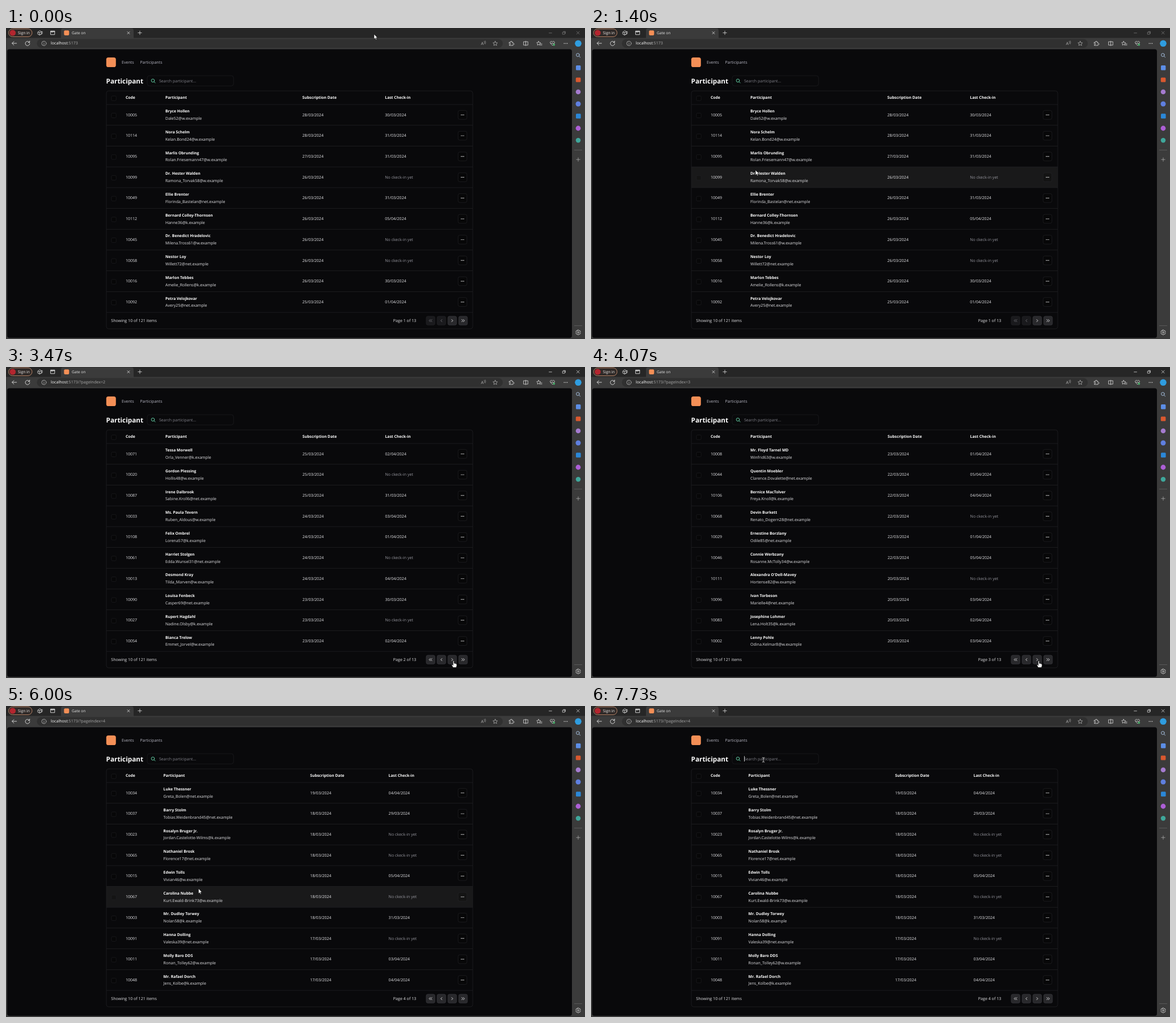
An HTML page with a canvas that plays this animation: 1021 px wide and 549 px high, repeating every 8000 ms.

```html
<!DOCTYPE html>
<html lang="en">
<head>
<meta charset="utf-8">
<title>Participants</title>
<style>
  html, body { margin: 0; width: 100%; height: 100%; overflow: hidden; background: #09090b; }
  canvas { display: block; width: 1021px; height: 549px; }
</style>
</head>
<body>
<canvas id="stage"></canvas>
<script>
const W = 1021, H = 549, LOOP = 8000, STEP = 1000 / 15;
const FONT = '"Open Sans", "Noto Sans", sans-serif';
const canvas = document.getElementById('stage');
const ctx = canvas.getContext('2d');
const dpr = window.devicePixelRatio || 1;
canvas.width = Math.round(W * dpr);
canvas.height = Math.round(H * dpr);

// code, name, mailbox, day of subscription, check-in (day/month or -)
const parse = s => s.trim().split('\n').map(r => r.trim().split(','));
const MAIL = { w: 'w.example', k: 'k.example', n: 'net.example' };

const PAGES = [
  { cols: [281, 522.5, 668.3], url: '', rows: parse(`
    10005,Bryce Hollen,Dale52@w,28,30/03
    10114,Nora Schelm,Kelan.Bond24@w,28,31/03
    10095,Marlis Obrunding,Rolan.Friesemann47@w,27,31/03
    10099,Dr. Hester Walden,Ramona_Torvak58@w,26,-
    10049,Ellie Brenter,Florinda_Bastelan@n,26,31/03
    10112,Bernard Colley-Thornsen,Hanne36@k,26,05/04
    10045,Dr. Benedict Hradelovic,Milena.Tross61@w,26,-
    10058,Nestor Loy,Willett72@n,26,-
    10016,Marlon Tebbes,Amelie_Rollens@k,26,30/03
    10092,Petra Velojkovar,Avery25@n,25,01/04`) },
  { cols: [281, 522.8, 668.5], url: '/?pageIndex=2', rows: parse(`
    10071,Tessa Morwell,Orla_Venner@k,25,02/04
    10020,Gordon Plessing,Hollis48@w,25,-
    10087,Irene Dalbrook,Sabine.Kroll6@n,25,31/03
    10033,Ms. Paula Tevern,Ruben_Aldous@w,24,03/04
    10108,Felix Ombrel,Lorena57@k,24,01/04
    10061,Harriet Stolgen,Edda.Wunsel31@n,24,-
    10013,Desmond Kray,Tilda_Marven@w,24,04/04
    10090,Louisa Fenbeck,Casper69@n,23,30/03
    10027,Rupert Hagdahl,Nadine.Olsby@k,23,-
    10054,Bianca Trelow,Emmet_Jorvel@w,23,02/04`) },
  { cols: [281, 523, 668.6], url: '/?pageIndex=3', rows: parse(`
    10008,Mr. Floyd Tarnel MD,Winfrid63@w,23,01/04
    10044,Quentin Moebler,Clarence.Dovalette@n,22,05/04
    10106,Bernice MacTolver,Freya.Knoll@k,22,04/04
    10068,Devin Burkett,Renato_Dogern28@n,22,-
    10029,Ernestine Borzlany,Odile85@n,22,01/04
    10046,Connie Werbzany,Rosanne.McTolly34@w,22,05/04
    10111,Alexandra O'Dell-Mavey,Hortense82@w,20,-
    10096,Ivan Torbeson,Marielle4@n,20,03/04
    10083,Josephine Lohmer,Lena.Holt35@k,20,02/04
    10002,Lenny Pohle,Odina.Kelmar8@w,20,03/04`) },
  { cols: [277.6, 536.2, 674.6], url: '/?pageIndex=4', rows: parse(`
    10034,Luke Thessner,Greta_Bolen@n,19,04/04
    10037,Barry Stolm,Tobias.Weidenbrand45@n,18,29/03
    10023,Rosalyn Bruger Jr.,Jordan.Castelotte-Wilms@k,18,-
    10065,Nathaniel Brosk,Florence17@n,18,-
    10015,Edwin Tolls,Vivian46@w,18,05/04
    10067,Carolina Nubbe,Kurt.Ewald-Brink73@w,18,-
    10003,Mr. Dudley Torwey,Nolan58@k,18,31/03
    10091,Hanna Dolling,Valeska39@n,17,-
    10011,Molly Baro DDS,Ronan_Tolley62@w,17,03/04
    10048,Mr. Rafael Dorch,Jens_Kolbe@k,17,04/04`) }
];
const PAGE_TIMES = [0, 2850, 4050, 5120];
const FOCUS_TIME = 2180, CARET_TIME = 7450;

// Pointer hot spot: time, x, y
const PATH = [
  [0, 649, 11], [200, 590, 40], [470, 400, 128], [670, 320, 165], [870, 300, 188],
  [1000, 296, 172], [1130, 292, 158], [1400, 290, 251], [1530, 292, 283], [1730, 300, 262],
  [1800, 430, 330], [1870, 680, 450], [1930, 789, 518], [2200, 789, 518], [2330, 789, 516],
  [3000, 789, 516], [3130, 789, 519], [3400, 789, 519], [3600, 789.5, 519.3],
  [4270, 789.5, 519.3], [4530, 780.5, 523], [4800, 785, 519.3], [5200, 785, 519.3],
  [5330, 700, 484], [5600, 450, 400], [5930, 345, 360], [6000, 339.5, 322.5],
  [6130, 334, 270], [6300, 330, 190], [6530, 328, 103], [6600, 328, 103],
  [6670, 331, 98], [6870, 331, 95.5], [7130, 331, 95.5], [7270, 320, 93], [7530, 304, 95]
];

function pointer(t) {
  const i = PATH.findIndex(p => p[0] > t);
  if (i < 0) return PATH[PATH.length - 1].slice(1);
  const [t0, x0, y0] = PATH[i - 1], [t1, x1, y1] = PATH[i];
  const k = (t - t0) / (t1 - t0);
  return [x0 + (x1 - x0) * k, y0 + (y1 - y0) * k];
}

function text(s, x, y, color = '#e4e4e7', size = 7.05, weight = 400) {
  ctx.font = `${weight} ${size}px ${FONT}`;
  ctx.fillStyle = color;
  ctx.fillText(s, x, y + size * 0.32);
}

const strong = (s, x, y) => text(s, x, y, '#fff', 6.8, 700);

function box(x, y, w, h, r, fill, stroke, lw = 0.6) {
  ctx.beginPath();
  ctx.roundRect(x, y, w, h, r);
  if (fill) { ctx.fillStyle = fill; ctx.fill(); }
  if (stroke) { ctx.strokeStyle = stroke; ctx.lineWidth = lw; ctx.stroke(); }
}

function dot(x, y, r, fill) {
  ctx.beginPath();
  ctx.arc(x, y, r, 0, 7);
  ctx.fillStyle = fill;
  ctx.fill();
}

// Strokes (and optionally fills) an SVG path placed at x, y
function icon(d, x, y, color = '#d8d8d8', lw = 0.8, fill) {
  ctx.save();
  ctx.translate(x, y);
  ctx.lineCap = ctx.lineJoin = 'round';
  const p = new Path2D(d);
  if (fill) { ctx.fillStyle = fill; ctx.fill(p); }
  ctx.strokeStyle = color;
  ctx.lineWidth = lw;
  ctx.stroke(p);
  ctx.restore();
}

function line(x0, x1, y, color) {
  ctx.fillStyle = color;
  ctx.fillRect(x0, y - 0.3, x1 - x0, 0.7);
}

function dots(x, y, color, gap = 2.1, r = 0.7) {
  for (const k of [-1, 0, 1]) dot(x + k * gap, y, r, color);
}

const CROSS = 'M-2-2L2 2M2-2L-2 2';
const PLUS = 'M-3.2 0H3.2M0-3.2V3.2';
const LENS = 'M2.2-.6A2.8 2.8 0 1 1-3.4-.6A2.8 2.8 0 1 1 2.2-.6M1.5 1.5L3.6 3.6';
const STAR = 'M0-4L1.2-1.4L4-1.1L1.9.8L2.5 3.6L0 2.2L-2.5 3.6L-1.9.8L-4-1.1L-1.2-1.4Z';

function browser(t, page) {
  ctx.fillStyle = '#262626';
  ctx.fillRect(0, 0, W, H);
  ctx.fillStyle = '#3b3b3b';
  ctx.fillRect(0, 17.5, W, H);
  box(97, 0.5, 128, 22, 4, '#3b3b3b');

  // Tab strip
  box(4.5, 1.5, 41.5, 14, 7, '#302a28', '#c58d6c', 0.9);
  dot(11.8, 8.5, 5.3, '#b3262f');
  text('Sign in', 21, 8.5, '#e8e8e8', 6.8);
  icon('M-3.8-1.2L-.6-3.8L2.4-2.2V2L-.8 3.8L-3.8 2.4ZM-.8-.4L4-2.4V1.6L-.8 3.8ZM-3.8-1.2L-.8-.4', 60, 8.5);
  icon('M-3.4-3.2H3.4V3.2H-3.4ZM-3.4-1.8H3.4M-3.4-2.5H3.4M-1.2-1.8V-.6', 82.4, 8.5, '#e0e0e0', 0.9);
  box(102.3, 4.2, 9, 8.8, 2, '#f48f56');
  text('Gate on', 116, 8.5, '#e8e8e8', 6.6);
  icon(CROSS, 216, 8.6, '#e0e0e0');
  icon(PLUS, 236, 8.5, '#dcdcdc');
  const ctl = t < FOCUS_TIME ? '#858585' : '#f0f0f0';
  icon('M-2.4 0H2.4', 960, 8.8, ctl, 0.7);
  icon('M-2.3-1.2H1.3V2.4H-2.3ZM-1-2.4H2.4V1.1', 984, 8.6, ctl, 0.7);
  icon('M-2.4-2.4L2.4 2.4M2.4-2.4L-2.4 2.4', 1008.7, 8.5, ctl, 0.7);

  // Toolbar
  icon('M4 0H-4M-.8-3.2L-4 0L-.8 3.2', 14.7, 27, '#e0e0e0', 0.9);
  icon('M3.4-1.6A3.9 3.9 0 1 0 3.9.5M3.7-4V-1.4H1.1', 38, 27, '#e0e0e0', 0.9);
  box(54.5, 19.5, 821.5, 15.5, 7.7, '#303030');
  icon('M4 0A4 4 0 1 1-4 0A4 4 0 1 1 4 0M0-.3V2M0-1.9V-1.8', 67, 27.2, '#d0d0d0', 0.7);
  text('localhost', 79, 27.2, '#fff', 7.1);
  const hostEnd = 79 + ctx.measureText('localhost').width;
  text(':5173' + page.url, hostEnd, 27.2, '#a8a8a8', 7.1);
  text('A', 837.5, 28, '#b8b8b8', 7.4);
  icon('M0-2Q1.2 0 0 2M1.8-2.8Q3.4 0 1.8 2.8', 843.3, 25.5, '#b8b8b8', 0.6);
  icon(STAR, 862.7, 27.3, '#c0c0c0', 0.7);
  icon('M-3.4-2H-1.2A1.3 1.3 0 1 1 1.2-2H2.8V.1A1.3 1.3 0 1 1 2.8 2V3.6H-3.4V2A1.3 1.3 0 1 0-3.4 0Z', 891, 27.2, '#dedede');
  icon('M-.8-3H-3.8V3H-.8M.8-3H3.8V3H.8M0-4V4', 916.5, 27.2, '#dedede');
  icon('M-1.3-3.8L-.2-1.5L2.4-1.2L.5.6L1 3.1L-1.3 1.9L-3.5 3.1L-3 .6L-4.8-1.2L-2.3-1.5ZM2 .8H4.6M2.2 2.9H4.6', 940.5, 27.2, '#dedede', 0.75);
  icon('M0 3.7L-3.5 0A2.1 2.1 0 0 1 0-2.6A2.1 2.1 0 0 1 3.5 0ZM-3 .2H-1L0-1L1 1L1.5.2H3', 963.5, 27, '#dedede', 0.75);
  dot(966.3, 29.5, 1.9, '#45a765');
  dots(987, 27.2, '#e0e0e0', 2.7, 0.75);

  // Sidebar
  dot(1009, 27.3, 5.8, '#2f9de0');
  icon(LENS, 1009, 48.2, '#a9c4e6', 1);
  box(1005, 66, 8.4, 8.4, 1.5, '#5c8ee6');
  box(1004.8, 87.4, 8.6, 8.2, 1.5, '#d9582f');
  dot(1009, 112.7, 4.3, '#a57bd0');
  dot(1009, 134, 4.5, '#5f7fe0');
  box(1005, 151.2, 8.6, 8.6, 1.5, '#2b88d8');
  dot(1009, 177, 4.4, '#ad5fd6');
  dot(1009, 198.2, 4.2, '#3fa79b');
  line(1002, 1016, 215.5, '#666');
  icon(PLUS, 1009, 232.2, '#b8b8b8', 0.7);
  line(1002, 1016, 525.5, '#666');
  icon('M1.4 0A1.4 1.4 0 1 1-1.4 0A1.4 1.4 0 1 1 1.4 0M-1-4.2H1L1.5-2.8L3-3.2L4.2-1.2L3.2 0L4.2 1.2L3 3.2L1.5 2.8L1 4.2H-1L-1.5 2.8L-3 3.2L-4.2 1.2L-3.2 0L-4.2-1.2L-3-3.2L-1.5-2.8Z', 1009, 537.3, '#d8d8d8', 0.8);

  box(2, 37.5, 996, 509.5, 4, '#09090b');
}

function checkbox(y) {
  box(186, y - 4, 8.2, 8.2, 1.8, 'rgba(0,0,0,.2)', '#222225');
}

function pagerButton(x, d, on) {
  box(x - 7.8, 508.8, 15.6, 15.6, 3, on ? '#29292c' : '#1a1a1d', on ? '#3c3c40' : '#242427');
  icon(d, x, 516.6, on ? '#f4f4f5' : '#77777c', 0.85);
}

const rowTop = i => 135 + i * 36.7;

function app(t, index, x, y) {
  const page = PAGES[index], [cName, cDate, cCheck] = page.cols;
  box(176.8, 52, 17, 17, 3.6, '#f48f56');
  text('Events', 204, 60.9, '#b8b8c4', 7.1, 500);
  text('Participants', 236.5, 60.9, '#b8b8c4', 7.1, 500);
  text('Participant', 176.6, 94.3, '#fff', 11.75, 700);
  box(249, 84.2, 152.3, 18, 4, null, '#222225');
  icon(LENS, 259.6, 93.4, '#6ee7b7', 0.85);
  text('Search participant...', 270, 93.4, '#84848c');
  if (t >= CARET_TIME) {
    ctx.fillStyle = '#f4f4f5';
    ctx.fillRect(270, 88.4, 0.8, 9.6);
  }

  const edge = '#232326';
  if (x > 177 && x < 823 && y >= 135 && y < 502) {
    ctx.fillStyle = '#19191a';
    ctx.fillRect(177, rowTop(Math.floor((y - 135) / 36.7)), 646, 36.7);
  }
  checkbox(124);
  strong('Code', 211, 123.3);
  strong('Participant', cName, 123.3);
  strong('Subscription Date', cDate, 123.3);
  strong('Last Check-in', cCheck, 123.3);

  page.rows.forEach(([code, name, mail, day, check], i) => {
    const top = rowTop(i), mid = top + 18.4;
    const [user, host] = mail.split('@');
    line(177, 823, top, edge);
    checkbox(mid + 0.9);
    text(code, 211, mid);
    strong(name, cName, top + 12.1);
    text(user + '@' + MAIL[host], cName, top + 24.8);
    text(day + '/03/2024', cDate, mid);
    if (check === '-') text('No ckeck-in yet', cCheck, mid, '#96969e');
    else text(check + '/2024', cCheck, mid);
    box(797.2, mid - 7.8, 15.6, 15.6, 3, 'rgba(0,0,0,.2)', '#28282b');
    dots(805, mid, '#fff');
  });
  line(177, 823, 502, edge);
  box(177, 111, 646, 420, 4, null, edge, 0.7);

  text('Showing 10 of 121 items', 185.3, 517, undefined, 7.1);
  text(`Page ${index + 1} of 13`, 682.8, 517, undefined, 7.1);
  const back = index > 0;
  pagerButton(748.7, 'M-.5-2L-2.5 0L-.5 2M2.3-2L.3 0L2.3 2', back);
  pagerButton(767.8, 'M1-2L-1 0L1 2', back);
  pagerButton(786.9, 'M-1-2L1 0L-1 2', true);
  pagerButton(806, 'M.5-2L2.5 0L.5 2M-2.3-2L-.3 0L-2.3 2', true);
}

function drawPointer(x, y) {
  if (y > 508 && y < 525 && x > 740 && x < 814) {
    icon('M-1 0Q0-1 1 0V4Q2 3.2 2.7 4.3Q3.8 3.6 4.4 4.8Q5.8 4.4 5.8 6V8.5Q5.4 10 4.6 11.3H-.7Q-2.4 9-3.2 7.3Q-3.2 5.9-1.9 6.3L-1 7.2Z',
      x, y, '#111', 0.8, '#fff');
  } else if (x > 249 && x < 401 && y > 84 && y < 102.3) {
    icon('M-1.8-4Q-.2-4 0-3.2Q.2-4 1.8-4M0-3.2V3.2M-1.8 4Q-.2 4 0 3.2Q.2 4 1.8 4', x, y, '#f0f0f0', 0.8);
  } else {
    icon('M0 0V8.6L2 6.8L3.3 9.7L4.7 9.1L3.4 6.2H6Z', x, y, '#111', 0.6, '#fff');
  }
}

function render(now) {
  const t = Math.floor((now % LOOP) / STEP + 0.06) * STEP;
  const index = PAGE_TIMES.filter(p => p <= t).length - 1;
  const [x, y] = pointer(t);
  ctx.setTransform(dpr, 0, 0, dpr, 0, 0);
  ctx.textRendering = 'geometricPrecision';
  browser(t, PAGES[index]);
  app(t, index, x, y);
  drawPointer(x, y);
}

const start = performance.now();
function tick() {
  render(performance.now() - start);
  requestAnimationFrame(tick);
}
tick();
</script>
</body>
</html>
```
